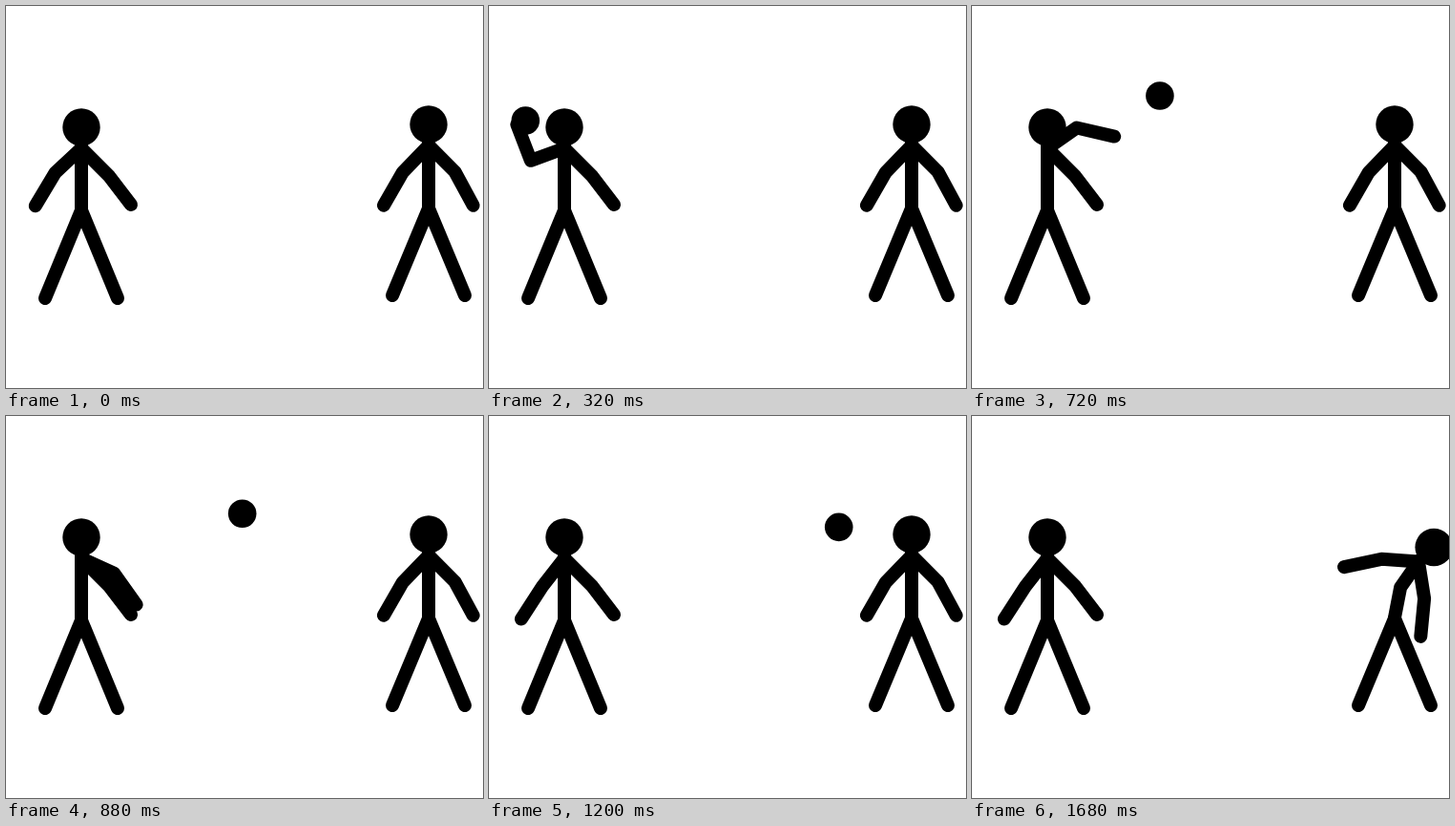
An HTML page that plays this animation: 500x400 px, repeating every 1.76 s.

```html
<!DOCTYPE html>
<html lang="en">
<head>
<meta charset="utf-8">
<title>Ball throw</title>
<style>
html, body { margin: 0; width: 100%; height: 100%; overflow: hidden; background: #fff; }
svg { display: block; width: 500px; height: 400px; }
path { fill: none; stroke: #000; stroke-width: 14; stroke-linecap: round; stroke-linejoin: round; }
</style>
</head>
<body>
<svg viewBox="0 0 500 400">
  <path d="M41 306 79 214 117 306M79 214V135M79 149 108 178 131 208"/>
  <circle cx="79" cy="127" r="19.7"/>
  <path id="arm"/>
  <path d="M405 303 443 212 481 303"/>
  <path id="body"/>
  <circle id="head" r="19.7"/>
  <circle id="ball" r="14.8"/>
</svg>
<script>
const STEP = 80, COUNT = 22;
const RELEASE = 6, HIT = 17;
const el = id => document.getElementById(id);
const arm = el('arm'), body = el('body'), head = el('head'), ball = el('ball');

// Throwing arm: [step, upper arm angle, forearm angle]
const swing = [
  [0, 137, 121], [4, 160, 249], [7, 274, 330],
  [9, 325, 373], [13, 444, 456], [14.5, 488, 483]
];

const mix = (a, b, u) => a + (b - a) * u;
const clamp = u => Math.min(1, Math.max(0, u));

function swingAngles(n) {
  const i = Math.max(1, swing.findIndex(k => k[0] > n));
  const end = n >= swing[swing.length - 1][0];
  const [a, b] = end ? swing.slice(-2) : [swing[i - 1], swing[i]];
  const u = clamp((n - a[0]) / (b[0] - a[0]));
  return [mix(a[1], b[1], u), mix(a[2], b[2], u)];
}

function polar([x, y], length, degrees) {
  const a = degrees * Math.PI / 180;
  return [x + length * Math.cos(a), y + length * Math.sin(a)];
}

function place(circle, [x, y]) {
  circle.setAttribute('cx', x);
  circle.setAttribute('cy', y);
}

function drawThrower(n) {
  const [upper, fore] = swingAngles(n);
  const shoulder = [79, 149];
  const elbow = polar(shoulder, 37.5, upper);
  const hand = polar(elbow, 40.5, fore);
  arm.setAttribute('d', `M${shoulder}L${elbow}L${hand}`);
  return hand;
}

function flight(n) {
  const d = n - 7;
  return [152 + 21 * d + 0.73 * d * d, 85 + 4.72 * d - 0.1 * d * d];
}

// Every bone turns from its resting angle to its knocked-back angle
function drawCatcher(n) {
  const u = clamp((n - HIT + 1) / 5) ** 1.2;
  const bone = (from, length, rest, bent) => polar(from, length, mix(rest, bent, u));
  const hip = [443, 211];
  const waist = bone(hip, 32, -90, -79);
  const neck = bone(waist, 33, -90, -55);
  const skull = bone(neck, 22, -90, -43);
  const elbowL = bone(neck, 39, 134, 184);
  const handL = bone(elbowL, 40, 120, 168);
  const elbowR = bone(neck, 39, 45, 81);
  const handR = bone(elbowR, 40, 61.5, 95.5);
  body.setAttribute('d',
    `M${hip}L${waist}L${neck}L${skull}` +
    `M${handL}L${elbowL}L${neck}L${elbowR}L${handR}`);
  place(head, skull);
}

function draw(n) {
  const hand = drawThrower(n);
  drawCatcher(n);
  place(ball, n < RELEASE ? [hand[0] + 9, hand[1] - 4] : flight(n));
  ball.style.display = n >= 2 && n <= HIT ? '' : 'none';
}

const start = performance.now();
function tick() {
  const t = Math.max(0, performance.now() - start);
  draw(Math.floor(t / STEP) % COUNT);
  requestAnimationFrame(tick);
}
tick();
</script>
</body>
</html>
```
